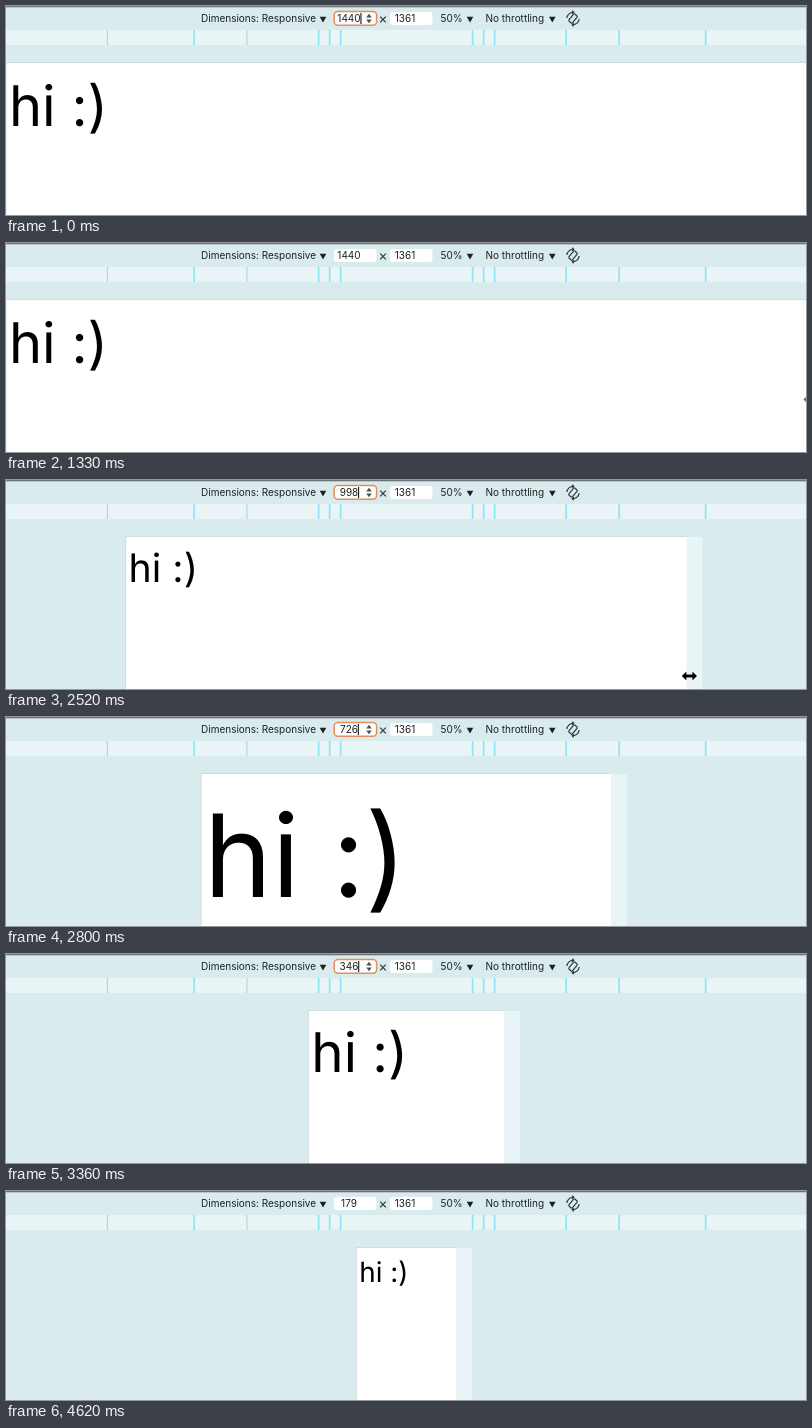
These frames come from a looping animation (800x209 px, 4760 ms). An HTML page:

```html
<!DOCTYPE html>
<html lang="en">
<head>
<meta charset="utf-8">
<title>Responsive text</title>
<style>
  html, body { margin: 0; width: 100%; height: 100%; overflow: hidden; background: #d9ebed; }
  svg { display: block; width: 800px; height: 209px; }
  text { font-family: Inter, "Open Sans", sans-serif; fill: #1c2122; white-space: pre; }
  .ui { font-size: 10px; }
  .mid { text-anchor: middle; }
  #hi { fill: #000; text-rendering: geometricPrecision; }
</style>
</head>
<body>
<svg viewBox="0 0 800 209">
  <rect width="800" height="209" fill="#d9ebed"/>
  <rect y="24" width="800" height="15" fill="#e9f4f6"/>
  <g id="ticks"></g>
  <rect width="800" height="1.3" fill="#6d7374"/>

  <text class="ui" x="195" y="16">Dimensions: Responsive</text>
  <text class="ui" x="434.5" y="16">50%</text>
  <text class="ui" x="479.5" y="16">No throttling</text>
  <path d="M313.7 10.8h6.6l-3.3 5.6zM460.7 10.8h6.6l-3.3 5.6zM543 10.8h6.6l-3.3 5.6z" fill="#1c2122"/>
  <path d="M374.2 10.7l5.6 5.6M379.8 10.7l-5.6 5.6" stroke="#2a3031" stroke-width="1.1"/>

  <rect x="384" y="6" width="42.5" height="13" rx="3" fill="#fff"/>
  <text class="ui mid" x="399" y="16">1361</text>

  <rect id="field" x="328" y="6" width="42.5" height="13" rx="3" fill="#fff"/>
  <g id="focus">
    <rect x="328.2" y="5.6" width="42.4" height="13.6" rx="3.6" fill="#fff" stroke="#e88c5c" stroke-width="1.5"/>
    <path d="M360.2 11.4l2.8-3.6 2.8 3.6zM360.2 13.6l2.8 3.6 2.8-3.6z" fill="#4a4f50"/>
  </g>
  <text id="num" class="ui mid" x="343" y="16"></text>
  <rect id="caret" y="7" width="1" height="11" fill="#000"/>

  <g transform="translate(567 12.5) rotate(40)" fill="none" stroke="#33393a" stroke-width="1.2">
    <rect x="-2.3" y="-4.6" width="4.6" height="9.2" rx="1.2"/>
    <path d="M-5 3.6A6.2 6.2 0 0 1-3.6-5M5-3.6A6.2 6.2 0 0 1 3.6 5"/>
    <path d="M-5.6-5.4l2.2.2-.2 2.2M5.6 5.4l-2.2-.2.2-2.2"/>
  </g>

  <rect id="grip" y="57" width="15.5" height="152" fill="#e9f4f6"/>
  <rect id="shade" y="56.2" height="160" fill="#000" opacity=".07"/>
  <rect id="page" y="57" height="152" fill="#fff"/>
  <text id="hi">hi :)</text>

  <path id="cursor" d="M-7.6 0l4.6-4.6v3h6v-3l4.6 4.6-4.6 4.6v-3h-6v3z"
    fill="#000" stroke="#fff" stroke-width="1.2" paint-order="stroke" stroke-linejoin="round"/>
</svg>
<script>
const LOOP = 4760, STEP = 70, CENTER = 400.5, SCALE = 800 / 1440;
const LAG = 12;          // the page trails the number a little
const BREAKPOINT = 768;
const $ = id => document.getElementById(id);
const set = (id, attrs) => {
  for (const k in attrs) $(id).setAttribute(k, attrs[k]);
};
const show = (id, on) => set(id, { visibility: on ? "visible" : "hidden" });

// preset widths marked on the ruler, in pairs around the centre
const presets = [[66, 1], [77, 1], [88, 1], [159.5, 0], [212.5, 1], [299, 1]];
for (const [d, cyan] of presets) {
  for (const side of [-1, 1]) {
    const r = document.createElementNS("http://www.w3.org/2000/svg", "rect");
    const gray = side < 0 && (!cyan || d > 290);
    const attrs = { x: CENTER + side * d - 0.7, y: 24, width: gray ? 1.2 : 1.7, height: 15,
      fill: gray ? "#bcd3d4" : "#8de6f7" };
    for (const k in attrs) r.setAttribute(k, attrs[k]);
    $("ticks").append(r);
  }
}

// viewport width over time, joined by a monotone cubic
const keys = [[2030, 1440], [2100, 1414], [2520, 998], [3080, 499],
  [3640, 232], [3780, 195], [3850, 195], [3990, 179]];
const slope = i => (keys[i + 1][1] - keys[i][1]) / (keys[i + 1][0] - keys[i][0]);
const tangent = i => {
  if (i === 0 || i === keys.length - 1) return 0;
  const a = slope(i - 1), b = slope(i);
  return a * b > 0 ? 2 * a * b / (a + b) : 0;
};

function widthAt(t) {
  const last = keys.length - 1;
  if (t <= keys[0][0]) return keys[0][1];
  if (t >= keys[last][0]) return keys[last][1];
  let i = 0;
  while (t >= keys[i + 1][0]) i++;
  const [t0, v0] = keys[i], [t1, v1] = keys[i + 1];
  const h = t1 - t0, u = (t - t0) / h, w = 1 - u;
  return w * w * (1 + 2 * u) * v0 + u * u * (3 - 2 * u) * v1
    + h * u * w * (w * tangent(i) - u * tangent(i + 1));
}

function draw(time) {
  const t = Math.floor((time % LOOP) / STEP) * STEP;
  const v = widthAt(t - LAG);
  const w = v * SCALE, left = CENTER - w / 2, right = CENTER + w / 2;

  set("page", { x: left, width: w });
  set("shade", { x: left - 0.8, width: w + 0.8 });
  set("grip", { x: right });

  const size = w * (v > BREAKPOINT ? 0.07 : 0.28);
  set("hi", { x: left + 2.5, y: 62 + size * 1.03, "font-size": size });

  const focused = t < 140 || (t >= 1750 && t < 4550);
  $("num").textContent = Math.round(widthAt(t));
  show("focus", focused);
  show("caret", focused && t < 4410);
  set("caret", { x: 343 + $("num").getComputedTextLength() / 2 - 0.2 });

  const drag = t >= 1750;
  const cx = drag ? right + 2.5 : 805;
  const cy = 156.5 + Math.max(0, t - 2100) * 0.094;
  show("cursor", t >= 1120 && cy < 216);
  set("cursor", { transform: `translate(${cx} ${cy})`, opacity: drag ? 1 : 0.6 });
}

const start = performance.now();
function tick() {
  draw(performance.now() - start);
  requestAnimationFrame(tick);
}
tick();
</script>
</body>
</html>
```
